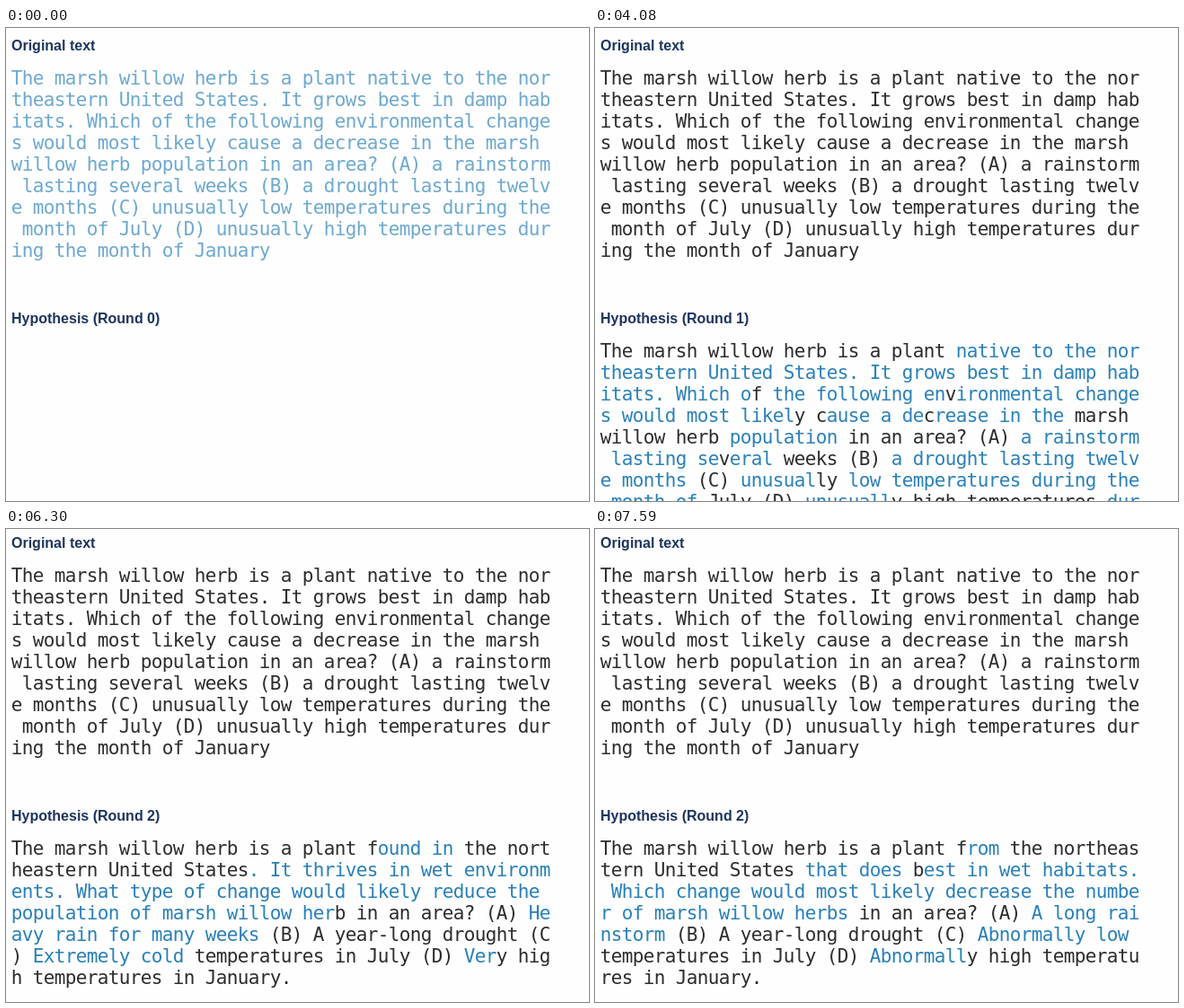
An HTML page for the animation above (8 s loop, 649x527 px).

```html
<!DOCTYPE html>
<html lang="en">
<head>
<meta charset="utf-8">
<title>Text rounds</title>
<style>
  html, body { margin: 0; width: 100%; height: 100%; overflow: hidden; background: #fefefe; }
  svg { display: block; width: 100%; height: 100%; }
  .head { font: bold 16px "Liberation Sans", Arial, sans-serif; fill: #1c355e; }
  .char { font: 21px "DejaVu Sans Mono", monospace; text-anchor: middle; fill: #2d2d2d; }
  .blue .char { fill: #2980b9; }
</style>
</head>
<body>
<svg viewBox="0 0 649 527">
  <g id="page">
    <text class="head" x="6" y="25">Original text</text>
    <text class="head" x="6" y="329" id="label"></text>
  </g>
</svg>
<script>
const LOOP = 8000, MOVE = 1290, FADE = 230;
const COLS = 50, CELL = 12, LINE = 24;

// Kept text, with {removed~added} between.
const edit1 = 'The marsh willow herb is a plant {native to the northeastern United States. ' +
  'It grows best in damp habitats. Which o~}f{ the following en~ound in the northeastern ' +
  'United States. It thri}v{ironmental changes would most likel~es in wet environments. ' +
  'What t}y{ ~pe of }c{ause a de~hange would likely redu}c{rease in the~e the population of}' +
  ' marsh willow herb {population ~}in an area? (A) {a rainstorm lasting se~Hea}v' +
  '{eral~y rain for many} weeks (B) {a drought lasting twelve months ~A year-long drought }' +
  '(C) {unusual~Extreme}ly {low temperatures during the month of~cold temperatures in}' +
  ' July (D) {unusuall~Ver}y high temperatures {during the month of~in} January{~.}';
const edit2 = 'The marsh willow herb is a plant f{ound in~rom} the northeastern United States' +
  '{. It thrives in wet environments. What type of change would likely reduce the ' +
  'population of marsh willow her~ that does }b{~est in wet habitats. Which change would ' +
  'most likely decrease the number of marsh willow herbs} in an area? (A) ' +
  '{Heavy rain for many weeks~A long rainstorm} (B) A year-long drought (C) ' +
  '{Extremely cold~Abnormally low} temperatures in July (D) {Ver~Abnormall}' +
  'y high temperatures in January.';
const question = edit1.replace(/\{([^~]*)~[^}]*\}/g, '$1');

const page = document.getElementById('page');
const label = document.getElementById('label');

function add(parent, tag, cls) {
  const el = document.createElementNS('http://www.w3.org/2000/svg', tag);
  if (cls) el.setAttribute('class', cls);
  return parent.appendChild(el);
}

const cell = i => ({ x: 6 + CELL * (i % COLS + 0.5), y: LINE * Math.floor(i / COLS) });

function place(el, x, y) {
  el.setAttribute('transform', `translate(${x.toFixed(2)} ${y.toFixed(2)})`);
}

function addChar(group, ch, i) {
  if (ch === ' ') return null;
  const el = add(group, 'text', 'char'), p = cell(i);
  el.textContent = ch;
  place(el, p.x, p.y);
  return el;
}

function makeLayer(markup, y, show, hide, start, settle) {
  const root = add(page, 'g');
  place(root, 0, y);
  const exit = add(root, 'g', 'blue'), enter = add(root, 'g', 'blue'), keep = add(root, 'g');
  const movers = [];
  let from = 0, to = 0;
  markup.split(/[{}]/).forEach((part, n) => {
    if (n % 2) {
      const [gone, fresh] = part.split('~');
      for (const ch of gone) addChar(exit, ch, from++);
      for (const ch of fresh) addChar(enter, ch, to++);
      return;
    }
    for (const ch of part) {
      const el = addChar(keep, ch, from);
      if (el && from !== to) movers.push({ el, a: cell(from), b: cell(to) });
      from++;
      to++;
    }
  });
  return { root, exit, enter, movers, show, hide, start, settle };
}

const layers = [
  makeLayer(`{~${question}}`, 63, 0, LOOP, -735, 940),
  makeLayer(`{~${question}}`, 367, 2080, 4080, 1750, 3390),
  makeLayer(edit1, 367, 4080, 6300, 4050, 5670),
  makeLayer(edit2, 367, 6300, LOOP, 6293, LOOP)
];

// Spans in which the picture stands still.
const holds = [[0, 80], [320, 490], [490, 940], [940, 2080], [2760, 3390], [3390, 4080],
  [4280, 4600], [5320, 5670], [5670, 6300], [6530, 6740], [7590, LOOP]];

const clamp = p => Math.min(1, Math.max(0, p));
const ease = p => p < 0.5 ? 4 * p ** 3 : 1 - 4 * (1 - p) ** 3;

function drawLayer(l, t) {
  const on = t >= l.show && t < l.hide;
  l.root.setAttribute('display', on ? 'inline' : 'none');
  if (!on) return;
  const k = ease(clamp((t - l.start) / MOVE));
  l.enter.setAttribute('opacity', k);
  l.enter.setAttribute('class', t < l.settle ? 'blue' : '');
  l.exit.setAttribute('opacity', 1 - ease(clamp((t - l.start) / FADE)));
  for (const { el, a, b } of l.movers) {
    place(el, a.x + (b.x - a.x) * k, a.y + (b.y - a.y) * k);
  }
}

let last = -1;
function draw(now) {
  let t = now % LOOP;
  const hold = holds.find(([a, b]) => t >= a && t < b);
  if (hold) t = hold[0];
  if (t !== last) {
    last = t;
    label.textContent = `Hypothesis (Round ${t < 4080 ? 0 : t < 6300 ? 1 : 2})`;
    place(page, 0, t < 4600 ? 0 : -4);
    for (const l of layers) drawLayer(l, t);
  }
}

const begin = performance.now();
function tick() {
  draw(performance.now() - begin);
  requestAnimationFrame(tick);
}
tick();
</script>
</body>
</html>
```
